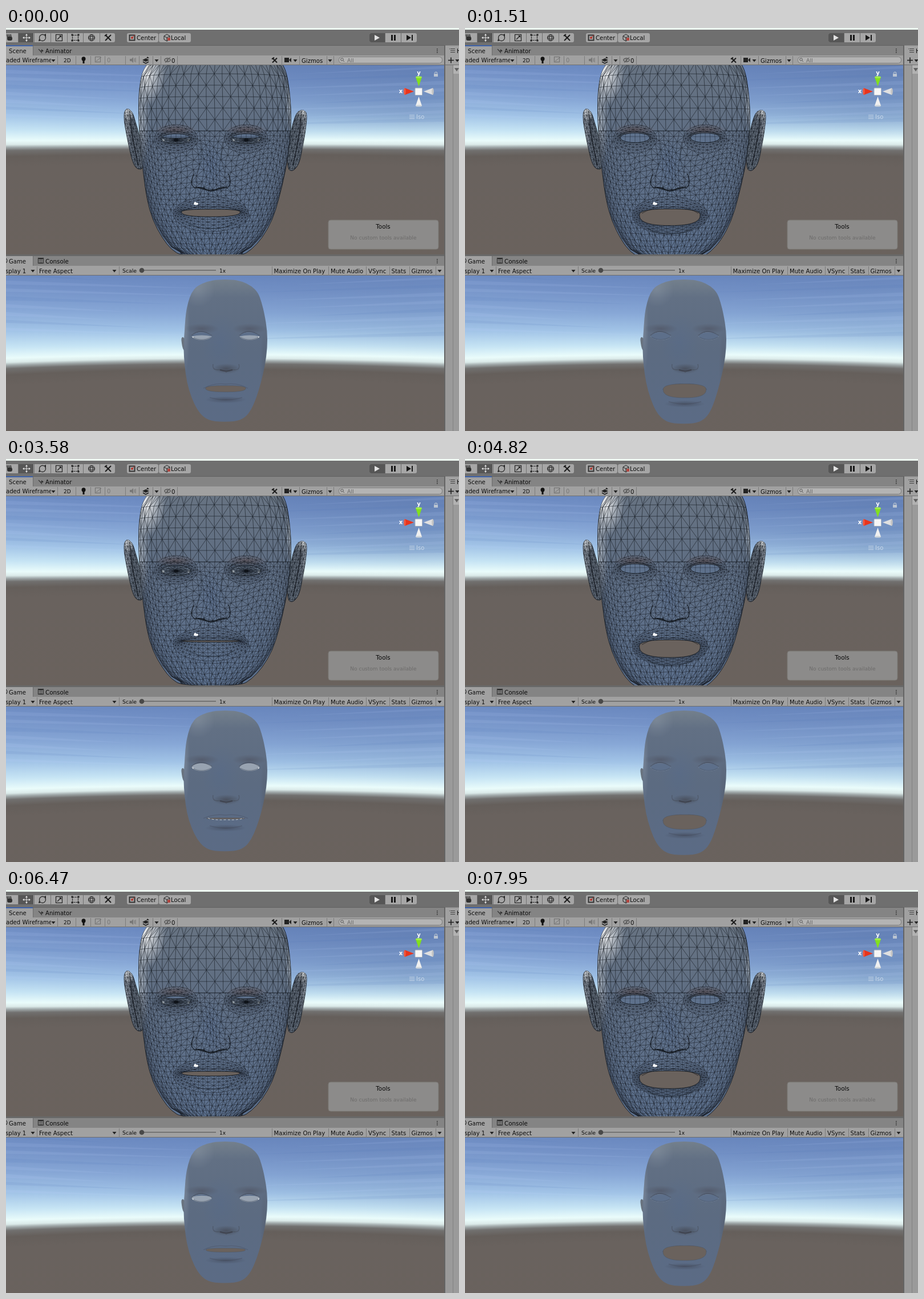
Write an HTML page with a canvas that moves like this. It is 794 px wide and 705 px high and loops after 8000 ms.

```html
<!DOCTYPE html>
<html lang="en">
<head>
<meta charset="utf-8">
<title>Face rig preview</title>
<style>
html, body { margin: 0; width: 100%; height: 100%; overflow: hidden; background: #848484; }
canvas { display: block; }
</style>
</head>
<body>
<canvas id="stage" width="794" height="705"></canvas>
<script>
const W = 794, H = 705, LOOP = 8000, STEP = 137.3;
const FONT = '"DejaVu Sans", Verdana, sans-serif';
const GROUND = '#6a625d', INK = '#141920', LIT = '#e2e2e2';
const stage = document.getElementById('stage').getContext('2d');
const still = document.createElement('canvas');
still.width = W; still.height = H;
let g = still.getContext('2d');

// ---------- drawing helpers ----------
function rect(x, y, w, h, c) { g.fillStyle = c; g.fillRect(x, y, w, h); }
function box(x, y, w, h, r, fill, edge) {
  g.beginPath(); g.roundRect(x, y, w, h, r);
  g.fillStyle = fill; g.fill();
  if (edge) { g.strokeStyle = edge; g.lineWidth = 1; g.stroke(); }
}
function text(s, x, y, size = 10.1, c = '#0c0c0c', align = 'left', weight = '') {
  g.font = `${weight} ${size}px ${FONT}`;
  g.textAlign = align; g.textBaseline = 'alphabetic';
  g.fillStyle = c; g.fillText(s, x, y);
}
function poly(p, c) {
  g.beginPath();
  for (let i = 0; i < p.length; i += 2) g.lineTo(p[i], p[i + 1]);
  g.closePath(); g.fillStyle = c; g.fill();
}
function line(p, c = '#161616', w = 1) {
  g.beginPath();
  for (let i = 0; i < p.length; i += 2) g.lineTo(p[i], p[i + 1]);
  g.strokeStyle = c; g.lineWidth = w; g.stroke();
}
function curve(p, c, w) {
  g.beginPath(); g.moveTo(p[0], p[1]);
  for (let i = 2; i < p.length; i += 4) g.quadraticCurveTo(p[i], p[i + 1], p[i + 2], p[i + 3]);
  g.strokeStyle = c; g.lineWidth = w; g.stroke();
}
function oval(x, y, rx, ry, c) {
  g.beginPath(); g.ellipse(x, y, rx, ry, 0, 0, 7); g.fillStyle = c; g.fill();
}
function glow(x, y, rx, ry, rgb, a) {
  g.save(); g.translate(x, y); g.scale(rx, ry);
  const f = g.createRadialGradient(0, 0, 0, 0, 0, 1);
  f.addColorStop(0, `rgba(${rgb},${a})`);
  f.addColorStop(.5, `rgba(${rgb},${a * .5})`);
  f.addColorStop(1, `rgba(${rgb},0)`);
  g.fillStyle = f; g.fillRect(-1, -1, 2, 2); g.restore();
}
function smooth(pts) {
  g.beginPath();
  const n = pts.length, mid = (a, b) => [(a[0] + b[0]) / 2, (a[1] + b[1]) / 2];
  g.moveTo(...mid(pts[n - 1], pts[0]));
  pts.forEach((p, i) => g.quadraticCurveTo(...p, ...mid(p, pts[(i + 1) % n])));
  g.closePath();
}
const pairs = a => a.reduce((o, v, i) => (i % 2 ? o[o.length - 1].push(v) : o.push([v]), o), []);
const arrow = (x, y, c = '#222') => poly([x - 3.5, y - 2, x + 3.5, y - 2, x, y + 2.5], c);
const bars = (x, y, w, c) => [-3, 0, 3].forEach(d => rect(x, y + d, w, 1, c));
const dots = (x, y) => [-3, 0, 3].forEach(d => rect(x, y + d, 1.6, 1.6, '#333'));
const seps = (xs, y) => xs.forEach(x => rect(x, y, 1, 16, '#7b7b7b'));
const noise = n => { const s = Math.sin(n * 127.1) * 43758.5453; return s - Math.floor(s) - .5; };
const clamp = v => Math.max(0, Math.min(1, v));

// ---------- still parts ----------
function sky(top, bottom, horizon, scale, bow, shade) {
  const stops = [[-185, '#5977ae'], [-150, '#6583bb'], [-110, '#7492c7'], [-75, '#87a7d6'],
    [-45, '#a2c4e7'], [-22, '#c6e4f4'], [-6, '#eafcfb'], [0, '#dbeae9'], [4, '#a2abac'],
    [9, '#71706f'], [18, '#655f5b'], [34, '#69625e'], [190, GROUND]];
  g.save(); g.beginPath(); g.rect(0, top, 768, bottom - top); g.clip();
  for (let x = 0; x < 768; x += 2) {
    const k = scale * Math.hypot(1, (x - 375) / 640), base = horizon + bow * ((x - 384) / 384) ** 2;
    const f = g.createLinearGradient(0, base - 185 * k, 0, base + 190 * k);
    stops.forEach(([d, c]) => f.addColorStop((d + 185) / 375, c));
    rect(x, top, 2, bottom - top, f);
    const dim = shade * clamp((x - 300) / 400);
    const s = g.createLinearGradient(0, base - 55, 0, base - 8);
    s.addColorStop(0, `rgba(70,96,148,${dim})`); s.addColorStop(1, 'rgba(70,96,148,0)');
    rect(x, top, 2, base - 8 - top, s);
  }
  for (let i = 0; i < 16; i++) {
    const y = top + 4 + i * (horizon - top - 35) / 16, side = i % 2 ? 768 : 0;
    const end = side ? 470 - noise(i) * 220 : 290 + noise(i) * 220;
    poly([side, y - 9, end, y + 5, side, y - 3 + noise(i + 9) * 3],
      i % 3 ? 'rgba(190,218,248,.1)' : 'rgba(72,108,172,.1)');
  }
  g.restore();
}

function toolbar() {
  rect(0, 0, W, H, '#848484');
  rect(0, 0, W, 4, '#edf6f1');
  rect(0, 3, W, 27, '#6f6f6f');
  box(-8, 9, 199, 16, 3, '#a6a6a6');
  rect(22, 9, 26, 16, '#565656');
  [21, 49, 78, 107, 135, 164].forEach(x => rect(x, 9, 1, 16, '#707070'));
  box(2, 15, 9, 7, 3, '#303030');
  [2, 5, 8].forEach(x => line([x + 1, 17, x, 11], '#303030', 1.7));
  line([30, 17, 42, 17], LIT); line([36, 11, 36, 23], LIT);
  for (const [a, b] of [[1, 0], [-1, 0], [0, 1], [0, -1]]) {
    const x = 36 + a * 7, y = 17 + b * 7;
    poly([x, y, x - a * 3 + b * 2, y - b * 3 + a * 2, x - a * 3 - b * 2, y - b * 3 - a * 2], LIT);
  }
  g.strokeStyle = '#222'; g.lineWidth = 1.2;
  g.beginPath(); g.arc(64, 17, 5.5, -.6, 2); g.stroke();
  g.beginPath(); g.arc(64, 17, 5.5, 2.6, 5.2); g.stroke();
  poly([66, 12, 70, 10, 70, 15], '#222'); poly([58, 19, 62, 22, 57, 23], '#222');
  g.strokeRect(87.5, 11.5, 11, 11);
  line([90, 20, 96, 14], '#222', 1.2); poly([93, 13, 97, 13, 97, 17], '#222');
  g.setLineDash([3, 1]); g.strokeRect(116.5, 12.5, 10, 9); g.setLineDash([]);
  [[116, 12], [127, 12], [116, 22], [127, 22]].forEach(([x, y]) => rect(x - 1.5, y - 1.5, 3, 3, '#222'));
  g.lineWidth = 1;
  g.beginPath(); g.arc(150, 17, 5.5, 0, 7); g.moveTo(155, 17);
  g.ellipse(150, 17, 5.5, 2.3, 0, 0, 7); g.moveTo(152.3, 17);
  g.ellipse(150, 17, 2.3, 5.5, 0, 0, 7); g.stroke();
  wrench(179, 17, 5);

  box(212, 9, 55, 16, 3, '#a6a6a6');
  box(268, 9, 56, 16, 3, '#a6a6a6');
  g.strokeStyle = '#333'; g.strokeRect(216.5, 12.5, 9, 9);
  oval(221, 17, 2, 2, '#b3372f'); line([221, 17, 226, 12], '#b3372f');
  g.strokeStyle = '#222';
  g.beginPath(); g.moveTo(277, 14); g.lineTo(282, 11); g.lineTo(287, 14); g.lineTo(287, 20);
  g.lineTo(282, 23); g.lineTo(277, 20); g.closePath(); g.lineTo(282, 17); g.lineTo(287, 14);
  g.moveTo(282, 17); g.lineTo(282, 23); g.stroke();
  box(283, 17, 5, 5, 1, '#b34640');
  text('Center', 229, 21, 10.2); text('Local', 289, 21, 10.2);

  box(637, 9, 83, 16, 3, '#a6a6a6');
  box(637, 9, 27, 16, [3, 0, 0, 3], '#565656');
  rect(664, 9, 1, 16, '#6a6a6a'); rect(692, 9, 1, 16, '#6a6a6a');
  poly([646, 12, 655, 17, 646, 22], LIT);
  rect(675, 12, 3, 10, '#181818'); rect(680, 12, 3, 10, '#181818');
  poly([702, 12, 710, 17, 702, 22], '#181818'); rect(711, 12, 2, 10, '#181818');
}
function wrench(x, y, r) {
  line([x - r, y - r, x + r, y + r], '#1c1c1c', 2);
  line([x + r, y - r, x - r, y + r], '#1c1c1c', 2);
  line([x - r - 1, y - r + 2, x - r + 3, y - r - 1], '#1c1c1c', 2);
}

function sceneBar() {
  rect(0, 30, 768, 1, '#626262');
  rect(0, 31, 47, 17, '#a1a1a1'); rect(0, 30, 47, 2, '#3e62a8');
  rect(47, 31, 1, 17, '#6b6b6b');
  text('Scene', 5, 44); text('Animator', 69, 44);
  line([57, 37, 60, 40, 65, 40], '#333', 1.2); line([60, 40, 63, 44], '#333', 1.2);
  poly([62, 37, 66, 40, 62, 42], '#333');
  dots(755, 39);
  rect(0, 48, 768, 17, '#a1a1a1'); rect(0, 64, 768, 1, '#707070');
  g.save(); g.beginPath(); g.rect(0, 48, 79, 16); g.clip();
  text('aded Wireframe', 0, 60); g.restore();
  arrow(83, 57);
  seps([90, 122, 148, 173, 209, 233, 257, 271, 300, 483, 514, 562, 574], 49);
  text('2D', 101, 60, 9);
  oval(136, 54, 3.5, 3.7, '#111'); rect(134.5, 57, 3, 5, '#111');
  g.strokeStyle = '#747474'; g.strokeRect(156.5, 50.5, 9, 9); line([158, 58, 167, 51], '#747474');
  text('0', 177, 60, 10, '#777');
  poly([217, 54, 220, 54, 223, 51, 223, 61, 220, 58, 217, 58], '#777');
  line([225, 53, 225, 59], '#777'); line([227, 52, 227, 60], '#777');
  poly([239, 56, 245, 53, 251, 56, 245, 59], '#222'); line([240, 59, 245, 62, 250, 59], '#222', 1.5);
  poly([248, 50, 251, 53, 246, 53], '#222');
  arrow(264, 57);
  g.strokeStyle = '#555'; g.beginPath(); g.ellipse(283, 56, 5, 3, 0, 0, 7); g.stroke();
  oval(283, 56, 1.5, 1.5, '#555'); line([279, 61, 288, 51], '#555');
  text('0', 290, 60.5);
  wrench(471, 56.5, 4);
  rect(488, 52, 8, 8, '#222'); poly([496, 56, 500, 52, 500, 60], '#222');
  arrow(507, 57); text('Gizmos', 518, 60.5); arrow(568, 57);
  box(583.5, 50.5, 181, 11, 5, '#b3b3b3', '#7a7a7a');
  g.beginPath(); g.arc(589, 55, 2.3, 0, 7); g.strokeStyle = '#555'; g.stroke();
  line([591, 57, 593, 59], '#555'); text('All', 598, 59.5, 9.4, '#666');
}

function gameBar() {
  rect(0, 396, 768, 3, '#686868');
  rect(0, 399, 47, 17, '#a1a1a1'); rect(47, 399, 1, 17, '#6b6b6b');
  g.strokeStyle = '#333'; g.lineWidth = 1.2; g.beginPath(); g.arc(-2, 407, 4, -1.5, 1.5); g.stroke();
  text('Game', 5, 411.5);
  g.strokeRect(56.5, 402.5, 9, 9); bars(58, 407, 6, '#333'); rect(56, 402, 10, 2, '#333');
  text('Console', 69, 411.5, 10.3); dots(755, 407);
  rect(0, 416, 768, 17, '#a1a1a1'); rect(0, 432, 768, 1, '#6e6e6e');
  text('splay 1', -1, 428.5); arrow(47, 425);
  text('Free Aspect', 58, 428.5); arrow(190, 425);
  text('Scale', 204, 428, 9.3); rect(238, 423, 130, 1.5, '#666'); oval(238, 424, 4.3, 4.3, '#494949');
  text('1x', 374, 428, 9);
  text('Maximize On Play', 469.5, 428.5); text('Mute Audio', 569, 428.5);
  text('VSync', 635, 428.5); text('Stats', 675.5, 428.5); text('Gizmos', 710.5, 428.5);
  arrow(760, 425);
  seps([54, 198, 466, 565, 631, 672, 707, 753], 417);
}

function sidePanel() {
  rect(768, 30, 2, H - 30, '#646464');
  rect(770, 31, 24, 17, '#a1a1a1'); bars(779, 39, 8, '#444'); rect(777, 36, 1, 1, '#444');
  text('H', 790, 43.5);
  rect(770, 48, 24, 17, '#a1a1a1'); rect(770, 64, 24, 1, '#707070');
  line([775, 56.5, 785, 56.5], '#222', 1.6); line([780, 51.5, 780, 61.5], '#222', 1.6); arrow(791, 57);
  rect(770, 65, 24, H - 65, '#9a9a9a');
  rect(783, 65, 1, H - 65, '#828282'); rect(784, 65, 10, 15, '#b2b2b2');
  poly([786, 70, 794, 70, 790, 76], '#606060');
}

function overlays() {
  poly([718, 86, 729, 86, 723.5, 102], '#83e01d'); oval(723.5, 86, 5.5, 1.8, '#a1ee4c');
  poly([699, 105, 699, 117, 715, 111], '#e8341c'); oval(699, 111, 1.8, 6, '#f0573d');
  poly([748, 105, 748, 117, 732, 111], '#e0e0e0'); oval(748, 111, 1.8, 6, '#c4c4c4');
  poly([718, 136, 729, 136, 723.5, 120], '#f0f0f0'); oval(723.5, 136, 5.5, 1.6, '#d0d6da');
  box(717, 105, 12.5, 12.5, 1, '#f6f6f6', '#a9b3bf');
  text('y', 723.5, 82, 10, '#fff', 'center', 'bold'); text('x', 692, 114, 10, '#fff', 'center', 'bold');
  rect(750, 80, 7, 5, '#bac4d1'); g.strokeStyle = '#bac4d1'; g.lineWidth = 1.2;
  g.beginPath(); g.arc(753.5, 79.5, 2.4, 3.14, 6.28); g.stroke();
  bars(707, 155, 9, '#c3d3e6'); text('Iso', 719, 159, 10, '#c9d8ea');
  box(565, 336, 193, 51, 4, '#8c8b8a', '#7b7875');
  text('Tools', 661, 351, 10.3, '#090909', 'center');
  text('No custom tools available', 661.5, 369.5, 9, '#6c6b6a', 'center');
}

// ---------- heads ----------
// profile rows: y, left edge, right edge
const bust = [[55, 256, 478], [65, 246, 486], [80, 238, 492], [110, 233, 497], [150, 232, 500],
  [200, 235, 498], [250, 240, 490], [300, 247, 478], [335, 257, 467], [365, 274, 449],
  [385, 290, 430], [396, 309, 412]];
const mask = [[440, 372, 396], [443, 354, 413], [451, 335, 430], [463, 325, 442], [480, 319, 448],
  [500, 315, 453], [530, 313, 458], [560, 311, 458], [590, 313, 454], [620, 317, 447],
  [645, 325, 439], [665, 335, 430], [679, 347, 419], [686, 364, 402]];
function sides(rows, y) {
  let i = 1;
  while (i < rows.length - 1 && rows[i][0] < y) i++;
  const [a, b] = [rows[i - 1], rows[i]], k = clamp((y - a[0]) / (b[0] - a[0]));
  return [a[1] + (b[1] - a[1]) * k, a[2] + (b[2] - a[2]) * k];
}
function outline(rows, drop) {
  smooth([...rows.map(r => [r[1], r[0] + drop(r[0])]),
    ...rows.slice().reverse().map(r => [r[2], r[0] + drop(r[0])])]);
}
function ring(cx, cy, rx, ry, p = 1, top = 1) {
  return a => {
    const c = Math.cos(a), s = Math.sin(a), h = s < 0 ? ry * top : ry;
    return [cx + rx * Math.sign(c) * Math.abs(c) ** p, cy + h * Math.sign(s) * Math.abs(s) ** p];
  };
}
function tracePath(f, n = 40) {
  for (let i = 0; i <= n; i++) {
    const p = f(i / n * Math.PI * 2);
    i ? g.lineTo(...p) : g.moveTo(...p);
  }
}
function mesh(at, rows, cols) {
  g.beginPath();
  for (let j = 0; j <= rows; j++) {
    for (let i = 0; i <= cols; i++) {
      const p = at(i, j);
      if (i < cols) { g.moveTo(...p); g.lineTo(...at(i + 1, j)); }
      if (j < rows) {
        g.moveTo(...p); g.lineTo(...at(i, j + 1));
        if (i < cols) {
          const flip = (i + j) % 2;
          g.moveTo(...at(i + flip, j)); g.lineTo(...at(i + 1 - flip, j + 1));
        }
      }
    }
  }
  g.stroke();
}
function ringMesh(inner, outer, rows, cols, bias = 1) {
  mesh((i, j) => {
    const a = i / cols * Math.PI * 2, k = (j / rows) ** bias, p = inner(a), q = outer(a);
    return [p[0] + (q[0] - p[0]) * k, p[1] + (q[1] - p[1]) * k];
  }, rows, cols);
}
const ears = [
  pairs([207, 146, 213, 140, 222, 147, 227, 165, 234, 188, 241, 218, 241, 246, 231, 248, 223, 238, 217, 215, 211, 185, 207, 163]),
  pairs([528, 150, 522, 143, 512, 145, 506, 156, 498, 185, 493, 220, 494, 247, 501, 251, 509, 245, 515, 233, 520, 208, 525, 180])];

function ear(pts) {
  const x0 = pts[0][0], dir = x0 < 360 ? 1 : -1;
  g.save(); smooth(pts); g.fillStyle = '#5e6875'; g.fill();
  g.strokeStyle = INK; g.lineWidth = .8; g.stroke(); g.clip();
  glow(x0 + dir * 7, 145, 13, 20, '235,238,240', .95);
  glow(x0 + dir * 4, 185, 9, 55, '190,196,204', .5);
  g.lineWidth = .55;
  mesh((i, j) => [x0 + dir * (i * 4.5 + j * 1.45 - 5) + noise(i * 7 + j) * 2, 140 + j * 7 + noise(i + j * 3) * 3], 16, 6);
  curve([x0 + dir * 10, 150, x0 + dir * 13, 190, x0 + dir * 25, 240], 'rgba(17,21,27,.6)', 2);
  g.restore();
}

function wireEye(cx, w) {
  const cy = 195 - 3.5 * w, rim = ring(cx, cy, 25.5, 9.5 - w, .95, .95);
  g.strokeStyle = INK; g.lineWidth = .5;
  ringMesh(rim, ring(cx, 194, 38, 25), 4, 30, 1.2);
  g.save(); g.beginPath(); tracePath(rim);
  g.fillStyle = '#677587'; g.fill(); g.clip();
  oval(cx - 23, 197, 3, 2.5, '#b5bec6'); oval(cx + 23, 197, 3, 2.5, '#b5bec6');
  g.lineWidth = .6;
  ringMesh(ring(cx, 196, 1, 1), ring(cx, 196, 25, 10), 4, 18, 1.2);
  oval(cx, 196, 3.5, 3, 'rgba(8,11,16,.65)');
  const lid = 186 + 18 * w;
  g.beginPath(); g.moveTo(cx - 30, 178); g.lineTo(cx + 30, 178); g.lineTo(cx + 30, lid - 2);
  g.quadraticCurveTo(cx, lid + 3 * (1 - w), cx - 30, lid - 2); g.closePath();
  g.fillStyle = '#5e718c'; g.fill(); g.lineWidth = .8; g.stroke();
  g.lineWidth = .4; g.beginPath();
  for (let i = -3; i <= 3; i++) { g.moveTo(cx + i * 8, 181); g.lineTo(cx + i * 9, lid); }
  g.moveTo(cx - 26, 190); g.lineTo(cx + 26, 190);
  if (w > .25) g.stroke();
  g.restore();
  g.beginPath(); tracePath(rim); g.lineWidth = .9; g.stroke();
  curve([cx - 29, 189, cx - 8, 173, cx + 27, 187], 'rgba(12,15,20,.6)', 1.2);
}

function wireHead(w) {
  const drop = y => 8 * w * clamp((y - 318) / 55);
  g.save(); g.beginPath(); g.rect(0, 65, 768, 331); g.clip();
  ears.forEach(ear);
  outline(bust, drop);
  const f = g.createLinearGradient(0, 65, 0, 396);
  f.addColorStop(0, '#677382'); f.addColorStop(.35, '#5f6e83'); f.addColorStop(1, '#5c708d');
  g.fillStyle = f; g.fill(); g.strokeStyle = INK; g.lineWidth = .9; g.stroke();
  g.save(); g.clip();
  glow(245, 78, 35, 58, '255,255,255', .9);
  glow(235, 165, 17, 95, '205,212,220', .65);
  glow(500, 130, 10, 60, '215,220,225', .6);
  glow(297, 178, 38, 10, '108,88,88', .6); glow(421, 178, 38, 10, '108,88,88', .6);
  glow(359, 240, 28, 55, '90,115,155', .35);

  const hole = ring(359, 318 + 10 * w, 50 + 3.5 * w, 1 + 19.5 * w, .8, .57);
  const lips = ring(359, 324 + 4 * w, 66, 29 + 4 * w);

  // base wire, leaving room for the eye and mouth loops
  g.save(); g.beginPath(); g.rect(0, 0, W, H);
  [298, 421].forEach(x => tracePath(ring(x, 194, 38, 25)));
  tracePath(lips); g.clip('evenodd');
  const across = (u, y) => {
    const [l, r] = sides(bust, y), s = .5 + .36 * Math.sin(u * Math.PI / 2) + .14 * u;
    return l + (r - l) * s;
  };
  g.strokeStyle = INK; g.lineWidth = .58;
  mesh((i, j) => {
    const u = i / 13 - 1, y = 60 + j * 20;
    return [across(u, y), y + 6 * u * u * (1 - j / 6)];
  }, 6, 26);
  g.lineWidth = .52;
  mesh((i, j) => {
    const u = i / 19 - 1, y = 180 + j * 9.3, soft = (1 - u * u) * clamp(j / 2);
    let x = across(u, y) + noise(i * 3 + j * 17) * 3.6 * soft;
    const dx = x - 360, band = Math.exp(-(((y - 240) / 45) ** 2));
    x -= dx * .5 * band * Math.exp(-((dx / 44) ** 2));
    const bend = 7 * Math.sin(u * Math.PI * 2.6) * band - 5 * u * u * clamp(j / 5);
    return [x, y + bend * clamp(j / 3) + noise(i * 11 + j * 5) * 3 * soft + drop(y)];
  }, 25, 38);
  g.restore();

  wireEye(298, w); wireEye(421, w);

  g.strokeStyle = INK; g.lineWidth = .5;
  ringMesh(hole, lips, 5, 46, 1.1);
  g.beginPath(); tracePath(hole, 60);
  g.fillStyle = GROUND; g.fill(); g.lineWidth = .9; g.stroke();
  const fold = 344 + 17 * w;
  curve([320, fold - 9, 338, fold + 2, 359, fold, 382, fold + 2, 400, fold - 9], 'rgba(12,15,20,.4)', 1.5);
  curve([310, 317 + 8 * w, 335, 309 + w, 359, 313 + w, 385, 309 + w, 409, 317 + 8 * w], 'rgba(12,15,20,.5)', 1.1);

  // nose
  curve([330, 255, 320, 272, 331, 280, 344, 277, 351, 283, 359, 288, 368, 283, 376, 277, 388, 280, 398, 271, 389, 254], 'rgba(9,12,16,.7)', 1.3);
  curve([336, 279, 346, 282, 357, 284, 372, 283, 383, 279], 'rgba(9,12,16,.6)', 2.4);
  curve([333, 262, 330, 273, 342, 273], 'rgba(9,12,16,.45)', 1);
  curve([386, 262, 389, 273, 377, 273], 'rgba(9,12,16,.45)', 1);
  curve([340, 200, 347, 230, 334, 254], 'rgba(9,12,16,.25)', 1.8);
  curve([380, 200, 373, 230, 385, 254], 'rgba(9,12,16,.25)', 1.8);
  g.restore();

  oval(333, 307.5, 4, 2, '#fff'); oval(331.5, 305.5, 1.6, 1.6, '#fff');
  g.restore();
}

function plainEye(cx, w) {
  const shape = ring(cx, 539, 17.5, 6.8, 1.05);
  glow(cx, 526, 30, 9, '72,72,84', .45);
  g.save(); g.beginPath(); tracePath(shape);
  g.fillStyle = '#98a3b1'; g.fill(); g.clip();
  const lid = 531 + 15.5 * w;
  g.beginPath(); g.moveTo(cx - 20, 528); g.lineTo(cx + 20, 528); g.lineTo(cx + 20, lid + 3);
  g.quadraticCurveTo(cx, lid - 3 * (1 - w), cx - 20, lid + 3);
  g.fillStyle = '#5d6f8a'; g.fill(); g.restore();
  curve([cx - 18, 538, cx - 3, 524, cx + 18, 538], 'rgba(65,72,86,.55)', 1.5);
  curve([cx - 16, 541, cx, 549, cx + 16, 541], 'rgba(70,80,96,.5)', 1.2);
  if (w < .75) rect(cx + (cx < 385 ? -16 : 15), 540, 1.5, 1.5, '#fff');
}

function plainHead(w) {
  const drop = y => 7 * w * clamp((y - 620) / 45);
  g.save();
  smooth(pairs([307, 542, 311, 540, 315, 550, 314, 566, 310, 562, 308, 552]));
  g.fillStyle = '#69737f'; g.fill();
  outline(mask, drop);
  const f = g.createLinearGradient(0, 441, 0, 690);
  f.addColorStop(0, '#737f8c'); f.addColorStop(.12, '#627084'); f.addColorStop(.5, '#5c6b81');
  f.addColorStop(1, '#5b6b85');
  g.fillStyle = f; g.fill(); g.clip();
  glow(336, 458, 30, 30, '180,190,200', .22);
  glow(314, 530, 8, 75, '165,175,187', .3);
  glow(376, 550, 34, 50, '80,105,145', .25);
  glow(385, 640, 55, 30, '85,110,150', .15);
  glow(454, 600, 9, 80, '80,83,92', .35);
  plainEye(343, w); plainEye(427, w);
  glow(386, 596, 24, 9, '62,64,72', .6);
  curve([363, 588, 361, 598, 371, 598, 379, 597, 386, 602, 393, 597, 401, 598, 411, 598, 408, 588], 'rgba(65,69,79,.45)', 1.3);
  curve([375, 598, 386, 602, 397, 598], 'rgba(52,53,60,.5)', 2.5);
  const cy = 628.5 + 4.5 * w;
  curve([346, cy, 365, 620, 385, 623, 406, 620, 424, cy], 'rgba(70,79,95,.4)', 1.3);
  const fold = 645 + 14 * w;
  glow(385, fold, 36, 6, '58,62,75', .5);
  curve([357, fold - 4, 385, fold + 4, 414, fold - 4], 'rgba(66,72,86,.4)', 1.3);
  g.beginPath(); tracePath(ring(385, cy, 33.5 + 4.5 * w, .8 + 15 * w, .8, .7), 50);
  g.fillStyle = GROUND; g.fill(); g.strokeStyle = 'rgba(74,82,96,.6)'; g.lineWidth = .8; g.stroke();
  if (w < .15) {
    g.setLineDash([4, 3]);
    curve([354, 628, 362, 632, 385, 631, 409, 632, 417, 628], '#c8ced2', 1);
    g.setLineDash([]);
  }
  g.restore();
}

// ---------- run ----------
toolbar(); sceneBar(); gameBar(); sidePanel();
sky(65, 396, 203, 1, 1, .3); sky(433, H, 578, 1.06, 7, .14);
overlays();
g = stage;

let shown = -1;
function tick(now) {
  const step = Math.floor((now % LOOP + 15) / STEP);
  if (step !== shown) {
    shown = step;
    const w = Math.abs(Math.cos(step * STEP / 1000 - 5.1));
    g.drawImage(still, 0, 0);
    wireHead(w); plainHead(w);
  }
  requestAnimationFrame(tick);
}
tick(performance.now());
</script>
</body>
</html>
```
